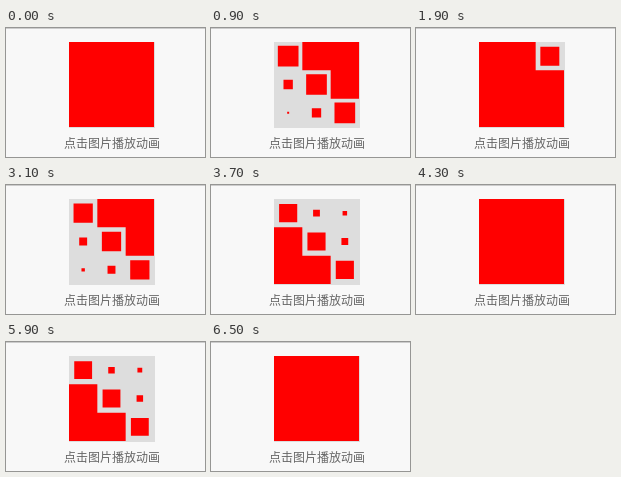
An HTML page that plays this animation: 199 px wide and 129 px high, repeating every 6900 ms.

```html
<!DOCTYPE html>
<html lang="zh-CN">
<head>
<meta charset="utf-8">
<title>点击图片播放动画</title>
<style>
  html, body { margin: 0; width: 100%; height: 100%; overflow: hidden; background: #f8f8f8; }
  svg { display: block; }
  text { font: 12px "Noto Sans CJK SC", "Noto Sans CJK", sans-serif; fill: #666; }
</style>
</head>
<body>
<svg width="199" height="129" viewBox="0 0 199 129">
  <rect width="199" height="129" fill="#f8f8f8"/>
  <rect width="199" height="1" fill="#ccc"/>
  <rect x="63" y="14" width="86" height="86" fill="#ddd"/>
  <path id="cubes" fill="#f00"/>
  <text x="58" y="120">点击图片播放动画</text>
</svg>
<script>
const LOOP = 6900, TICK = 100;
const LEFT = 63, TOP = 14, CELL = 85 / 3;
const RATE = 0.22;    // share of a shrink or grow phase covered per tick
const STAGGER = 0.4;  // delay between neighbouring diagonals, in phases
const WAVES = [
  { start: 500, lead: 0.19 },
  { start: 2700, lead: 0.24 },
  { start: 4900, lead: 0.23 }
];

const path = document.getElementById('cubes');
const cubes = Array.from({ length: 9 }, (_, i) => {
  const col = i % 3, row = Math.floor(i / 3);
  return {
    cx: LEFT + (col + 0.5) * CELL,
    cy: TOP + (row + 0.5) * CELL,
    delay: (col + 2 - row) * STAGGER
  };
});

// Linear from 1 to 0 and back over two phases, otherwise full size.
const scaleAt = phase => Math.min(1, Math.abs(1 - phase));

const square = (cx, cy, size) =>
  `M${cx - size / 2} ${cy - size / 2}h${size}v${size}h${-size}z`;

function draw(ms) {
  const now = Math.floor((ms % LOOP) / TICK) * TICK;
  const wave = WAVES.filter(w => now >= w.start).pop();
  const progress = wave ? wave.lead + (now - wave.start) / TICK * RATE : 0;
  // A single path keeps the seams between full cubes solid.
  path.setAttribute('d', cubes.map(({ cx, cy, delay }) =>
    square(cx, cy, CELL * scaleAt(progress - delay))).join(''));
}

const began = performance.now();
function frame() {
  draw(performance.now() - began);
  requestAnimationFrame(frame);
}
frame();
</script>
</body>
</html>
```
